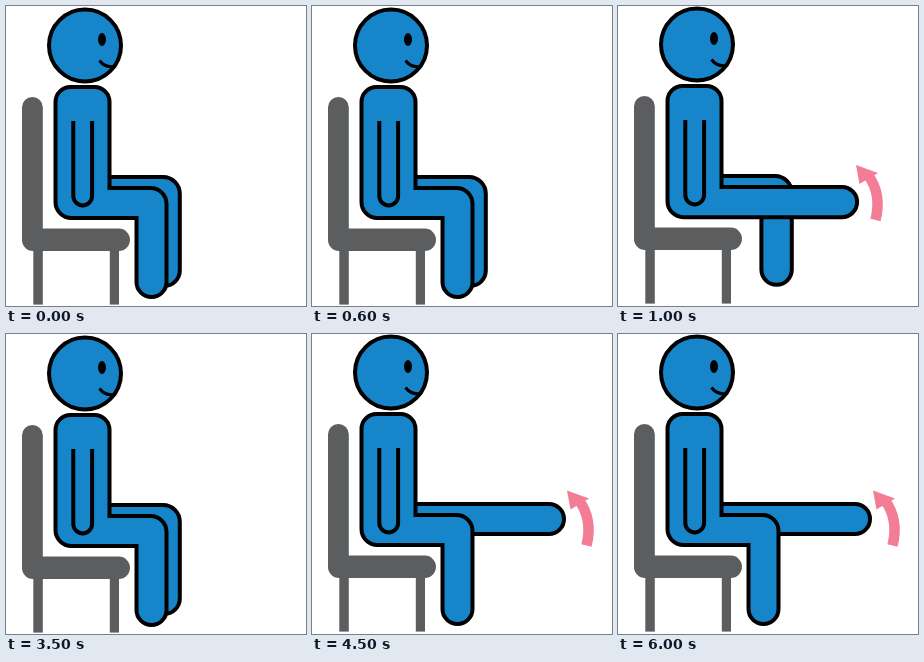
An HTML page that plays this animation: 300 px wide and 300 px high, repeating every 7000 ms.

```html
<!DOCTYPE html>
<html lang="en">
<head>
<meta charset="utf-8">
<title>Seated leg raises</title>
<style>
  html, body { margin: 0; width: 100%; height: 100%; overflow: hidden; background: #fff; }
  svg { display: block; width: 100%; height: 100%; }
  .chair { fill: #5c5d5f; }
  .body { fill: #1685ca; stroke: #000; stroke-width: 4; }
  .line { fill: none; stroke: #000; stroke-width: 4; }
  .arrow { fill: #f27d95; }
  .arrow path { fill: none; stroke: #f27d95; stroke-width: 10.5; }

  /* hard switches between the rest pose and the two raised poses */
  .figure, .near-up, .near-down, .far-up, .far-down { animation: 7s step-end infinite; }
  .figure { animation-name: lift; }
  .near-up { animation-name: near-on; }
  .near-down { animation-name: near-off; }
  .far-up { animation-name: far-on; }
  .far-down { animation-name: far-off; }

  @keyframes lift {
    0%, 50% { transform: translateY(0); }
    14.2857%, 64.2857% { transform: translateY(-1px); }
    100% { transform: translateY(0); }
  }
  @keyframes near-on {
    0%, 50%, 100% { visibility: hidden; }
    14.2857% { visibility: visible; }
  }
  @keyframes near-off {
    0%, 50%, 100% { visibility: visible; }
    14.2857% { visibility: hidden; }
  }
  @keyframes far-on {
    0%, 100% { visibility: hidden; }
    64.2857% { visibility: visible; }
  }
  @keyframes far-off {
    0%, 100% { visibility: visible; }
    64.2857% { visibility: hidden; }
  }
</style>
</head>
<body>
<svg viewBox="0 0 300 300">
  <defs>
    <g id="arrow" class="arrow">
      <path d="M250 170 Q264 189 257.5 215"/>
      <polygon points="238,160 260,168 241.5,179"/>
    </g>
  </defs>
  <g class="figure">
    <g class="chair">
      <path d="M16 101.3 A10.4 10.4 0 0 1 36.8 101.3 V222.6 H112.8 A11.2 11.2 0 0 1 112.8 245 H27 A11 11 0 0 1 16 234 Z"/>
      <rect x="27.3" y="240" width="9.5" height="58.6"/>
      <rect x="103.8" y="240" width="9.2" height="58.6"/>
    </g>

    <path class="body far-down" d="M95 171 H157 A16.8 16.8 0 0 1 173.8 187.8 V264.6 A15.2 15.2 0 0 1 143.4 264.6 V201 H95 Z"/>
    <path class="body far-up" d="M95 171 H237 A15 15 0 0 1 237 201 H95 Z"/>

    <path class="body near-down" d="M64.5 81 H88.5 A15 15 0 0 1 103.5 96 V182 H144.5 A16 16 0 0 1 160.5 198 V276 A15 15 0 0 1 130.5 276 V212 H65.5 A16 16 0 0 1 49.5 196 V96 A15 15 0 0 1 64.5 81 Z"/>
    <path class="body near-up" d="M64.5 81 H88.5 A15 15 0 0 1 103.5 96 V182 H224 A15.1 15.1 0 0 1 224 212.2 H65.5 A16 16 0 0 1 49.5 196 V96 A15 15 0 0 1 64.5 81 Z"/>

    <path class="line" d="M67.3 115 V190 A9.4 9.4 0 0 0 86.1 190 V115"/>

    <circle class="body" cx="79" cy="39.5" r="36"/>
    <ellipse cx="96" cy="33.5" rx="4" ry="6.5"/>
    <path class="line" stroke-linecap="butt" style="stroke-width:3" d="M93.5 54.5 Q99 62 109 60.5"/>

    <use class="near-up" href="#arrow"/>
    <use class="far-up" href="#arrow" x="17" y="-2.5"/>
  </g>
</svg>
</body>
</html>
```
